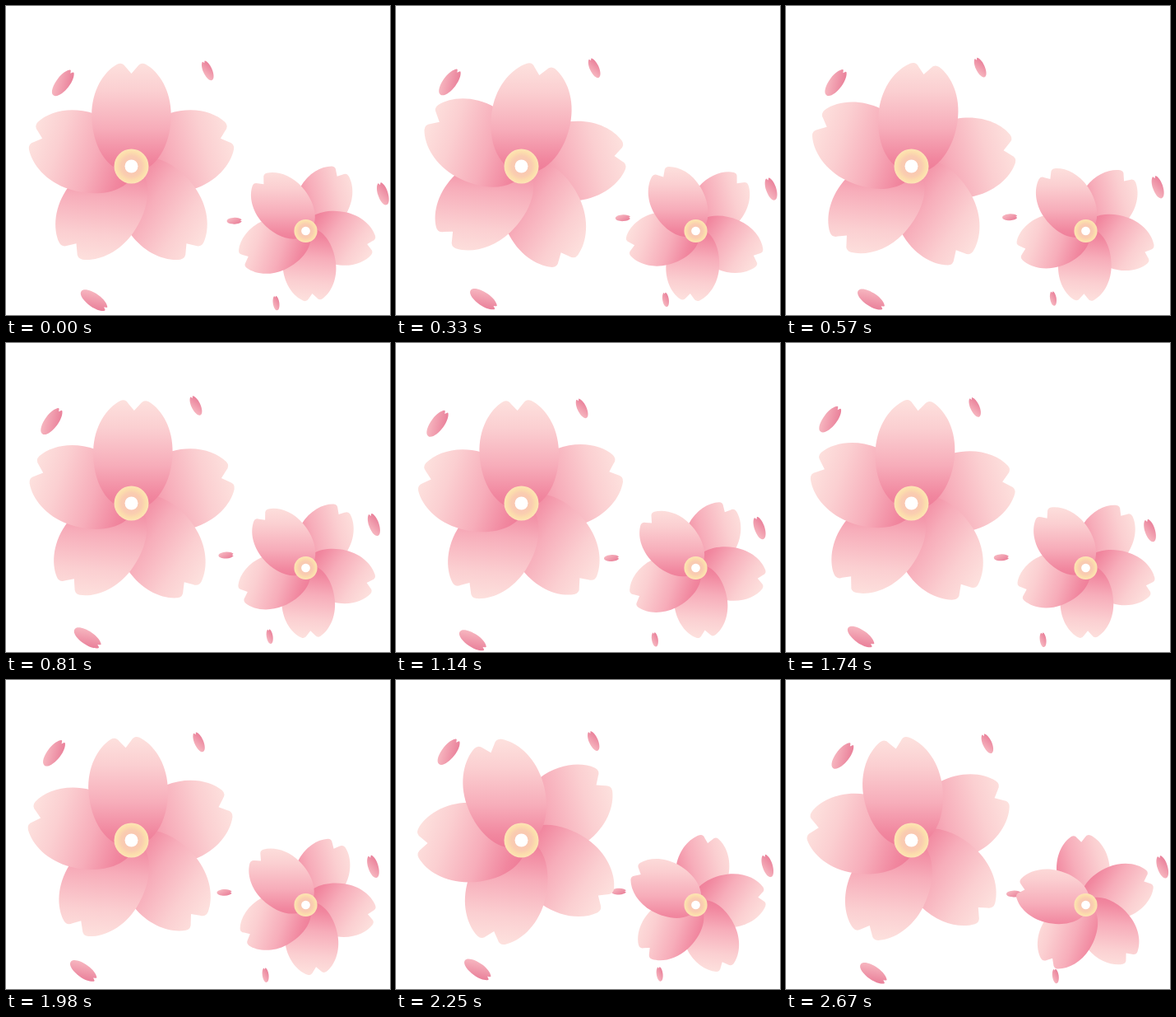
Recreate the animation shown at these times as an HTML page. Size 467 by 375 pixels, loop 2700 ms.

```html
<!DOCTYPE html>
<html lang="en">
<head>
<meta charset="utf-8">
<title>Drifting blossoms</title>
<style>
html, body { margin: 0; width: 100%; height: 100%; overflow: hidden; background: #fff; }
svg { display: block; width: 100%; height: 100%; }
</style>
</head>
<body>
<svg viewBox="0 0 467 375">
  <defs id="defs">
    <linearGradient id="blush">
      <stop offset="0" stop-color="#fde0dd"/>
      <stop offset=".25" stop-color="#fbcfd1"/>
      <stop offset=".6" stop-color="#f7adba"/>
      <stop offset=".88" stop-color="#f1879f"/>
      <stop offset="1" stop-color="#ef7c98"/>
    </linearGradient>
    <linearGradient id="loose" gradientUnits="userSpaceOnUse" x1="-44" y1="-20" x2="44" y2="-90">
      <stop offset="0" stop-color="#f7b8c1"/>
      <stop offset="1" stop-color="#ea829b"/>
    </linearGradient>
    <radialGradient id="heart">
      <stop offset="0" stop-color="#f8c0b6"/>
      <stop offset=".6" stop-color="#facdb0"/>
      <stop offset=".85" stop-color="#fcdfac"/>
      <stop offset="1" stop-color="#fde4b6"/>
    </radialGradient>
    <path id="petal" d="M0 6C-30 6-47-28-47-62C-47-91-33-113-17-122Q-11-125-7-119L0-111L7-119Q11-125 17-122C33-113 47-91 47-62C47-28 30 6 0 6Z"/>
  </defs>
  <g id="drift"></g>
  <g id="flowers"></g>
</svg>
<script>
const NS = 'http://www.w3.org/2000/svg';
const LOOP = 2700, STEP = 30, PETALS = 5;
const defs = document.getElementById('defs');
const drift = document.getElementById('drift');
const flowerLayer = document.getElementById('flowers');

function add(parent, tag, attrs) {
  const el = document.createElementNS(NS, tag);
  for (const k in attrs) el.setAttribute(k, attrs[k]);
  return parent.appendChild(el);
}

const wave = (t, period, peak = 0) => Math.cos(2 * Math.PI * (t - peak) / period);
const smooth = u => u * u * (3 - 2 * u);
const clamp = u => Math.min(1, Math.max(0, u));

// Smooth curve through [time, value] keys
function curve(keys) {
  const last = keys.length - 1;
  const tangent = i => {
    const a = keys[Math.max(i - 1, 0)], b = keys[Math.min(i + 1, last)];
    return (b[1] - a[1]) / (b[0] - a[0]);
  };
  return t => {
    let i = 0;
    while (i < last - 1 && t > keys[i + 1][0]) i++;
    const [t0, a] = keys[i], [t1, b] = keys[i + 1];
    const d = t1 - t0, u = (t - t0) / d, v = 1 - u;
    return a * smooth(v) + b * smooth(u)
      + d * u * v * (tangent(i) * v - tangent(i + 1) * u);
  };
}

// Both flowers swing together; the small one runs on at the end
const swing = curve([[0, 0], [330, 11], [810, 1.7], [1100, -3], [1500, 7.5], [1980, -3.5], [2250, -19], [2670, -9.5]]);
const runOn = t => -24.5 * smooth(clamp((t - 2250) / 420));

const flowers = [
  { x: 152.5, y: 194.5, size: 1, dip: 1.5, turn: swing },
  { x: 364.5, y: 273, size: 0.67, dip: 0, turn: t => swing(t) + runOn(t) - 42 }
];

// Screen direction of each petal's light side, clockwise from up
const lightSide = [0, 75, 125, 185, 288];

flowers.forEach((f, n) => {
  const g = add(flowerLayer, 'g', { transform: `translate(${f.x} ${f.y}) scale(${f.size})` });
  f.wheel = add(g, 'g', {});
  f.shades = [];
  for (let i = 1; i <= PETALS; i++) {
    const id = `shade${n}-${i}`, angle = i * 360 / PETALS;
    const el = add(defs, 'linearGradient', {
      id, href: '#blush', gradientUnits: 'userSpaceOnUse', x1: 0, y1: -122, x2: 0, y2: 4
    });
    f.shades.push({ el, tilt: lightSide[i % PETALS] - angle });
    add(f.wheel, 'use', { href: '#petal', fill: `url(#${id})`, transform: `rotate(${angle})` });
  }
  add(g, 'circle', { r: 21, fill: 'url(#heart)' });
  add(g, 'circle', { r: 8, fill: '#fff' });
});

// Loose petals: x, y, length, angle
[
  [69, 93, 37, 38],
  [245.5, 78, 25, -24],
  [458.5, 227.5, 28, -18],
  [277.5, 260, 18, 88],
  [106.5, 356, 37, 125],
  [328.5, 360, 17.5, -8]
].forEach(([x, y, len, angle]) => add(drift, 'use', {
  href: '#petal', fill: 'url(#loose)',
  transform: `translate(${x} ${y}) rotate(${angle}) scale(${len * 0.44 / 94} ${len / 129}) translate(0 58)`
}));

function draw(time) {
  const t = Math.floor(time % LOOP / STEP) * STEP;
  for (const f of flowers) {
    const turn = f.turn(t);
    f.wheel.setAttribute('transform', `translate(0 ${f.dip}) rotate(${turn}) scale(1.027)`);
    // The light keeps its direction while the petals turn
    for (const s of f.shades) s.el.setAttribute('gradientTransform', `rotate(${s.tilt - turn} 0 -59)`);
  }
  const x = 9 * (wave(t, 2830) - 1);
  const y = -0.5 - 3 * wave(t, 1700, 540);
  const tilt = -0.4 - 0.95 * wave(t, LOOP, 850);
  drift.setAttribute('transform', `translate(${x} ${y}) rotate(${tilt} 265 220)`);
}

const start = performance.now();
function tick() {
  draw(performance.now() - start);
  requestAnimationFrame(tick);
}
tick();
</script>
</body>
</html>
```
